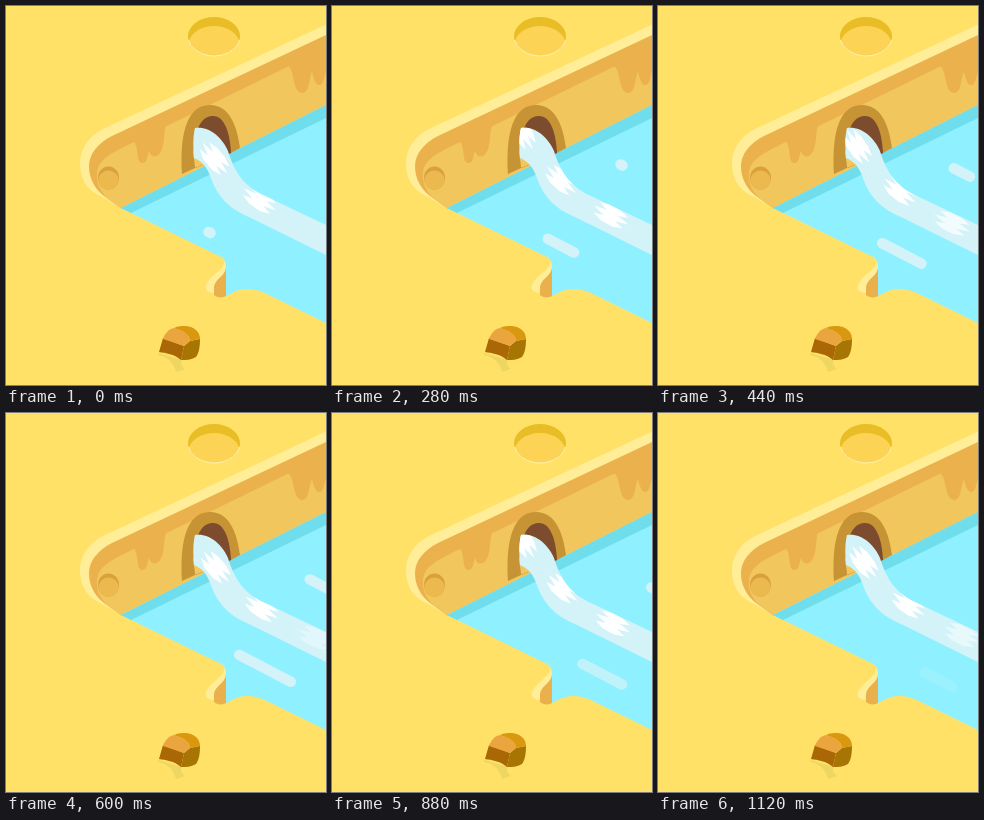
Animation, 320 px wide and 379 px high, one loop 1160 ms. Source, as an HTML page with a canvas:

```html
<!DOCTYPE html>
<html lang="en">
<head>
<meta charset="utf-8">
<title>Water channel</title>
<style>
html, body { margin: 0; width: 100%; height: 100%; overflow: hidden; background: #ffe168; }
canvas { display: block; width: 320px; height: 379px; }
</style>
</head>
<body>
<canvas id="stage" width="320" height="379"></canvas>
<script>
const ctx = document.getElementById('stage').getContext('2d');
const LOOP = 1160, WAVE = LOOP / 2, STEP = 40;
const FOAM = '#d3f3f9', WALL = '#f1c65d', STAIN = '#ebb14d', RIM = '#ffed97';

const clamp = v => Math.max(0, Math.min(1, v));

const fill = (color, d) => {
  ctx.fillStyle = color;
  ctx.fill(new Path2D(d));
};

const oval = (color, x, y, rx, ry) => {
  ctx.fillStyle = color;
  ctx.beginPath();
  ctx.ellipse(x, y, rx, ry, 0, 0, Math.PI * 2);
  ctx.fill();
};

// A sunken hole: the floor is the same ellipse, lowered and clipped.
function hole(x, y, rx, ry, drop, side, floor) {
  ctx.save();
  oval(side, x, y, rx, ry);
  ctx.clip();
  oval(floor, x, y + drop, rx, ry);
  ctx.restore();
}

function ground() {
  ctx.fillStyle = '#ffe168';
  ctx.fillRect(0, 0, 320, 379);
  hole(208, 30.5, 26, 19.5, 9, '#e8bd25', '#fcd355');
  ctx.strokeStyle = '#fff3b5';
  ctx.beginPath();
  ctx.ellipse(208, 30.5, 26, 19.5, 0, 0.2, Math.PI - 0.2);
  ctx.stroke();
}

function wall() {
  fill(RIM, 'M320 18.5L97 123C81 131 73 145 74 160C75 177 84 186 98 192L116 203L320 100Z');
  fill(STAIN, 'M320 29L106 130C92 137 83 148 83 160C83 172 88 182 98 190L116 203L320 100Z');
  fill(WALL, 'M320 42L128 136C105 147 93 153 91 166C90 177 94 185 101 192L116 203L320 100Z');
  fill(STAIN, 'M128 135C133 142 130 156 136 157C142 157 141 149 143 145C145 152 151 152 154 147C159 140 157 130 160 119Z');
  fill(STAIN, 'M282 60C289 64 286 86 296 87C304 87 303 70 306 66C308 74 310 80 314 79C318 78 318 70 320 66V41Z');
  hole(102.5, 172, 10.5, 11.5, 4, '#d9a03c', '#ebb94e');
}

function pool() {
  fill('#8ff1ff', 'M115 202L320 99V317L267 291C250 281 236 281 226 287L220 290V262C220 255 218 252 213 250Z');
  fill('#70ddec', 'M115 202L320 99V112L125 207Z');
  fill(RIM, 'M210 247C217 250 219 253 218 258C216 265 204 269 200 279C198 284 203 287 208 287C208 278 214 274 218 268C221 263 221 255 214 249Z');
  fill('#e9b04c', 'M220 262C219 270 209 273 208 281V289C211 292 217 292 220 290Z');
}

function arch() {
  fill('#c69434', 'M176 168C174 135 178 99 204 99C223 99 231 119 234 142L225 147L189 162Z');
  fill('#7d4b2d', 'M189 162C187 136 190 110 207 110C219 110 224 128 225 147Z');
  fill(WALL, 'M189 162L187 145L204 148V156Z');
}

function rock() {
  fill('#eed663', 'M152 347L176 354C173 358 177 361 179 363L170 366C168 357 161 350 152 349Z');
  fill('#a96805', 'M157 332L178 340L175 354C168 348 160 347 153 346Z');
  fill('#a67503', 'M178 340L184 335L194 333C194 340 193 347 190 351C185 354 180 354 175 354Z');
  fill('#eba53f', 'M157 333C159 327 163 323 168 322C178 325 184 329 184 335L178 340Z');
  fill('#d9980f', 'M168 322C172 320 176 320 180 320C188 321 194 325 194 333L184 335C184 329 178 325 168 322Z');
}

const stream = new Path2D('M189 122C203 120 216 131 222 145C228 165 238 181 259 190L320 219V249L245 212C221 202 211 189 205 172C201 161 197 156 188 152C187 140 187 130 189 122Z');

// The centre line of the current is one cubic curve, run at an even pace.
const bezier = (a, b, c, d, u) =>
  a * (1 - u) ** 3 + 3 * b * u * (1 - u) ** 2 + 3 * c * u * u * (1 - u) + d * u ** 3;

function at(age) {
  const u = (age + 435) / 1740;
  return [bezier(183, 211, 264, 322, u), bezier(112, 173, 206, 230, u)];
}

function onFlow(age, off) {
  const [x, y] = at(age), [x1, y1] = at(age - 20), [x2, y2] = at(age + 20);
  const dx = x2 - x1, dy = y2 - y1, len = Math.hypot(dx, dy);
  return [x - dy / len * off, y + dx / len * off];
}

// Three teeth point downstream and, mirrored through the centre, three upstream.
function drawGlint(age) {
  ctx.globalAlpha = clamp(1 - (age - 900) / 420);
  ctx.fillStyle = '#fff';
  ctx.beginPath();
  for (const side of [1, -1]) {
    for (let i = 0; i <= 6; i++) {
      const reach = i % 2 ? 120 + 65 * Math.sin(Math.PI * i / 6) : 60;
      ctx.lineTo(...onFlow(age + side * reach, side * (i - 3) * 3));
    }
  }
  ctx.fill();
  ctx.globalAlpha = 1;
}

function current(t) {
  ctx.fillStyle = FOAM;
  ctx.fill(stream);
  ctx.save();
  ctx.clip(stream);
  const oldest = t + WAVE;
  for (let age = t % WAVE - WAVE; age <= oldest; age += WAVE) drawGlint(age);
  ctx.restore();
}

// The head runs ahead, then slows to a drift while the tail catches up.
function ripple(t, dx, dy) {
  if (t < 0) return;
  const head = 204.5 + 0.134 * Math.min(t, 600) + 0.018 * Math.max(0, t - 600);
  const tail = 202.5 + 0.044 * t + 0.000012 * t * t;
  const y = x => 226.5 + (x - 203.5) * 0.52;
  ctx.globalAlpha = clamp(1 - (t - 760) / 430);
  ctx.strokeStyle = FOAM;
  ctx.lineWidth = 10.5;
  ctx.lineCap = 'round';
  ctx.beginPath();
  ctx.moveTo(tail + dx, y(tail) + dy);
  ctx.lineTo(head + dx, y(head) + dy);
  ctx.stroke();
  ctx.globalAlpha = 1;
}

function draw(t) {
  ctx.lineWidth = 1;
  ground();
  wall();
  pool();
  arch();
  ripple(t, 0, 0);
  ripple(t - 280, 86, -67.5);
  current(t);
  rock();
}

const start = performance.now();
function tick(now) {
  const t = Math.max(0, now - start) % LOOP;
  draw(Math.floor(t / STEP) * STEP);
  requestAnimationFrame(tick);
}
draw(0);
requestAnimationFrame(tick);
</script>
</body>
</html>
```
